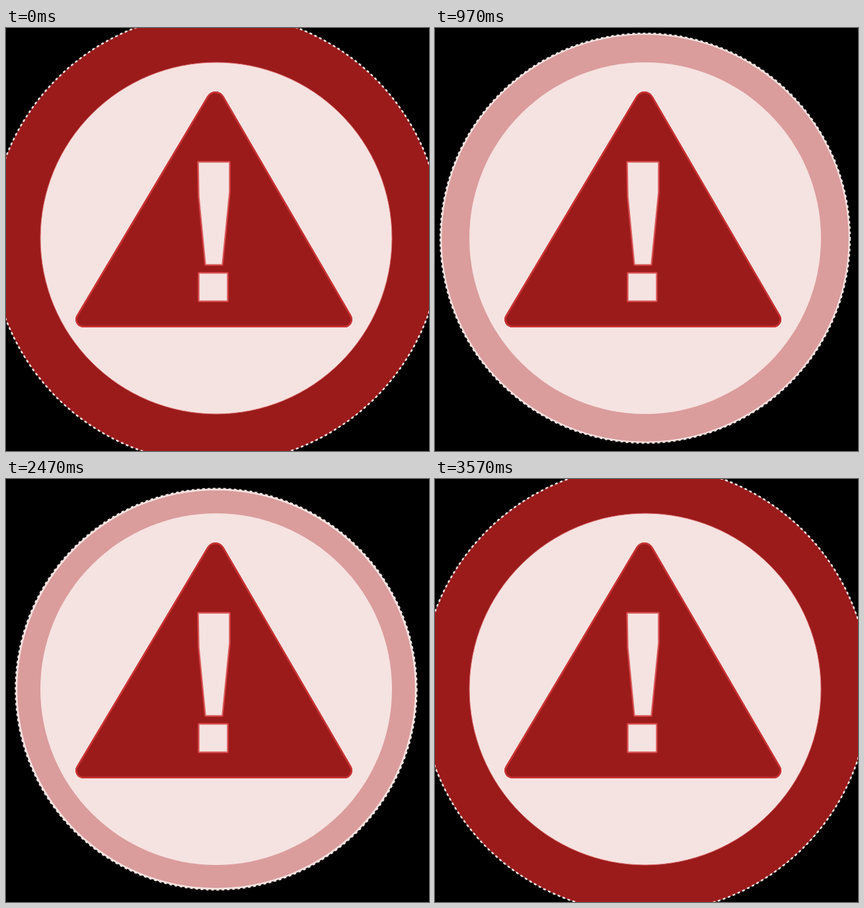
Animation, 640 px wide and 640 px high, one loop 3.61 s. Source, as an HTML page with a canvas:

```html
<!DOCTYPE html>
<html lang="en">
<head>
<meta charset="utf-8">
<title>Pulsing warning sign</title>
<style>
  html, body { margin: 0; width: 100%; height: 100%; overflow: hidden; background: #000; }
  canvas { display: block; width: 640px; height: 640px; }
</style>
</head>
<body>
<canvas id="stage" width="640" height="640"></canvas>
<script>
const ctx = document.getElementById('stage').getContext('2d');
const LOOP = 3610;
const STEPS = 108;
const CENTER = 318;
const INNER_RADIUS = 266;
const MAX_RADIUS = 342;
const SHRINK = 58;
const PALE = '#f5e3e1';
const DARK = '#9b1b1b';
const EDGE = '#cb3333';
const SOFT_EDGE = '#d96666';

// Ring colours, each used until the pulse passes its limit.
const RING_COLORS = [
  [0.077, DARK],
  [0.28, '#b8352e'],
  [0.52, '#dc6b6b'],
  [0.82, '#db9c9c'],
  [Infinity, PALE]
];

function circle(radius) {
  const path = new Path2D();
  path.arc(CENTER, CENTER, radius, 0, Math.PI * 2);
  return path;
}

function polygon(points) {
  const path = new Path2D();
  points.forEach(([x, y]) => path.lineTo(x, y));
  path.closePath();
  return path;
}

function roundedTriangle() {
  const path = new Path2D();
  path.moveTo(315, 453);
  path.arcTo(96, 453, 317, 82, 12);
  path.arcTo(317, 82, 533, 453, 14.5);
  path.arcTo(533, 453, 315, 453, 12);
  path.closePath();
  return path;
}

const disc = circle(INNER_RADIUS);
const triangle = roundedTriangle();
const bar = polygon([[291, 203], [338, 203], [338, 248], [327, 358], [302, 358], [292, 255]]);
const dot = polygon([[292, 371], [335, 371], [335, 413], [292, 413]]);

function fill(path, color) {
  ctx.fillStyle = color;
  ctx.fill(path);
}

function stroke(path, color, width, dash = []) {
  ctx.strokeStyle = color;
  ctx.lineWidth = width;
  ctx.setLineDash(dash);
  ctx.stroke(path);
}

function drawRing(pulse) {
  const radius = MAX_RADIUS - SHRINK * pulse;
  const color = RING_COLORS.find(([limit]) => pulse < limit)[1];
  fill(circle(radius - 1), PALE);
  fill(circle(radius - 1 - 4 * pulse), color);
  stroke(circle(radius - 1), PALE, 2.5, [4, 4]);
  fill(disc, PALE);
  if (pulse < 0.28) stroke(disc, SOFT_EDGE, 1);
}

function drawSign() {
  fill(triangle, DARK);
  ctx.save();
  ctx.clip(triangle);
  stroke(triangle, EDGE, 5);
  ctx.restore();
  for (const part of [bar, dot]) {
    stroke(part, EDGE, 4);
    fill(part, PALE);
    stroke(part, SOFT_EDGE, 1.5);
  }
}

function draw(now) {
  const step = Math.floor((now % LOOP) / LOOP * STEPS);
  const pulse = 1 - Math.abs(1 - 2 * step / STEPS);
  ctx.fillStyle = '#000';
  ctx.fillRect(0, 0, 640, 640);
  ctx.lineJoin = 'round';
  drawRing(pulse);
  drawSign();
}

const start = performance.now();
function tick() {
  draw(performance.now() - start);
  requestAnimationFrame(tick);
}
tick();
</script>
</body>
</html>
```
